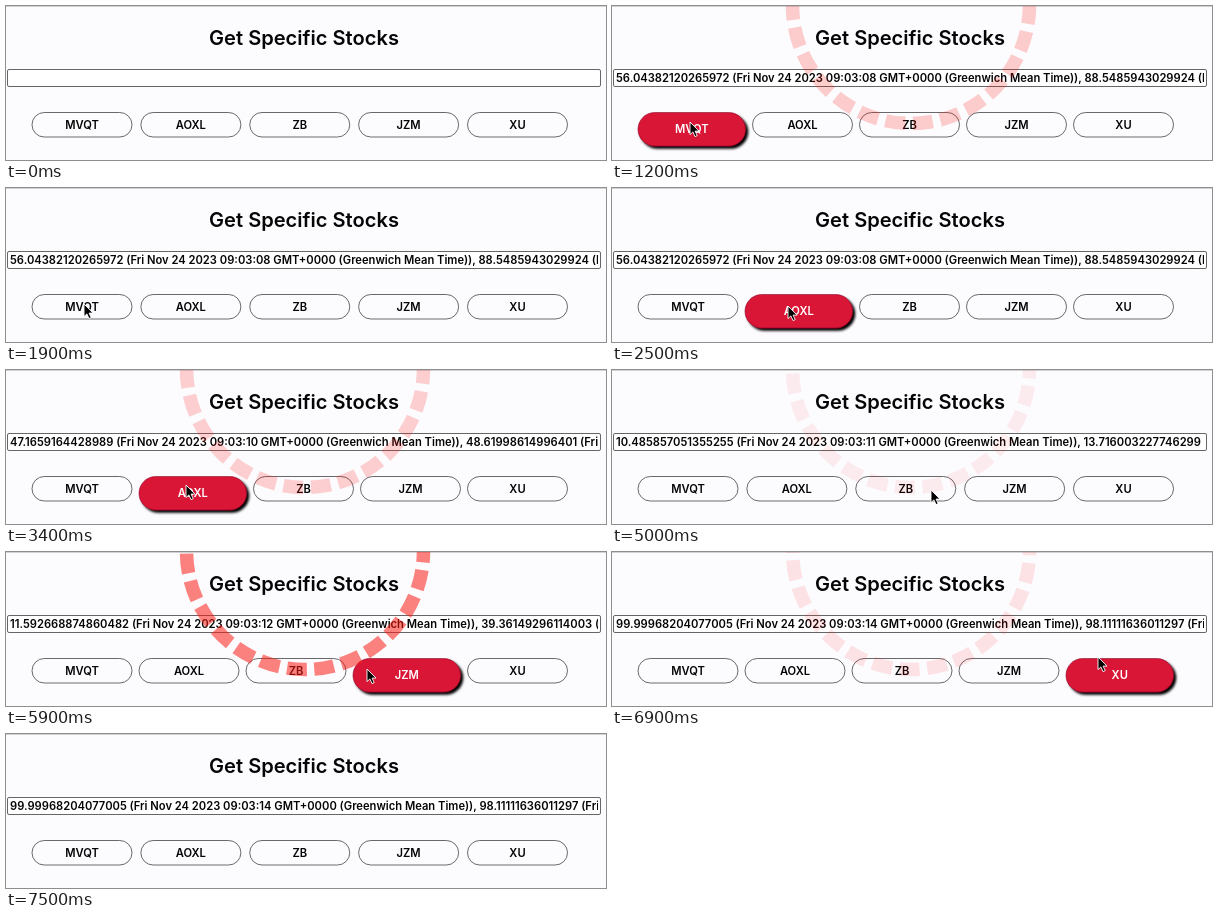
An HTML page that plays this animation: 600x154 px, repeating every 10 s.

```html
<!DOCTYPE html>
<html lang="en">
<head>
<meta charset="utf-8">
<title>Get Specific Stocks</title>
<style>
  html, body { margin: 0; width: 100%; height: 100%; overflow: hidden; background: #fcfbfe; }
  #stage { display: block; width: 600px; height: 154px; }
  text { font-family: Inter, "Open Sans", sans-serif; font-weight: 600; font-size: 11.2px; fill: #050505; }
  .middle { text-anchor: middle; }
  #title { font-size: 20.1px; }
</style>
</head>
<body>
<svg id="stage" viewBox="0 0 600 154">
  <rect width="600" height="154" fill="#fcfbfe"/>
  <rect width="600" height="1" fill="#d2d1d4"/>
  <text id="title" class="middle" x="298" y="38.5">Get Specific Stocks</text>
  <rect x="1.5" y="63.5" width="593" height="17" rx="1.5" fill="#fff" stroke="#666"/>
  <svg x="4" y="64" width="588" height="16"><text id="prices" x="0" y="12"></text></svg>
  <defs>
    <filter id="shadow" x="-10%" y="-20%" width="125%" height="150%">
      <feDropShadow dx="2.5" dy="2.5" stdDeviation="1" flood-color="#000"/>
    </filter>
  </defs>
  <g id="buttons"></g>
  <circle id="ring" cx="299" cy="-1" r="118.5" fill="none" stroke="#fb1a14" stroke-width="13.5"/>
  <path id="cursor" d="M0 0V12.6L2.9 9.9L5 14.6L7.2 13.6L5.1 9.1H9Z" fill="#000" stroke="#fff" stroke-width=".9"/>
</svg>
<script>
const LOOP = 10000, STEP = 100;
const byId = id => document.getElementById(id);
const prices = byId('prices'), ring = byId('ring'), cursor = byId('cursor');

// Response time, clock seconds, first and second price
const quotes = [
  [1050, '08', '56.04382120265972', '88.5485943029924'],
  [3255, '10', '47.1659164428989', '48.61998614996401'],
  [4380, '11', '10.485857051355255', '13.716003227746299'],
  [5550, '12', '11.592668874860482', '39.36149296114003'],
  [6795, '14', '99.99968204077005', '98.11111636011297']
];

// Start, end, button
const hovers = [
  [700, 1600, 0], [2000, 2300, 0], [2400, 3700, 1],
  [3800, 4900, 2], [5200, 6400, 3], [6500, 7200, 4]
];

// Time, x, y of the pointer tip
const pointer = [
  [600, 72, 134], [900, 78, 116], [1900, 78, 116], [2500, 176, 118],
  [2800, 180, 115], [3500, 180, 115], [4000, 312, 121], [4200, 319, 120],
  [5000, 319, 120], [5400, 361, 117], [6100, 361, 117], [6600, 482, 112],
  [6800, 486, 105], [7100, 486, 105], [7500, 500, 156]
];

const PULSE = 700, PEAK = 0.54, DASHES = 27;
const pitch = 2 * Math.PI * 118.5 / DASHES;
ring.setAttribute('stroke-dasharray', `${pitch * 0.72} ${pitch * 0.28}`);

function add(parent, tag, attrs) {
  const node = document.createElementNS('http://www.w3.org/2000/svg', tag);
  set(node, attrs);
  return parent.appendChild(node);
}

function set(node, attrs) {
  for (const key in attrs) node.setAttribute(key, attrs[key]);
}

const buttons = ['MVQT', 'AOXL', 'ZB', 'JZM', 'XU'].map(name => {
  const group = add(byId('buttons'), 'g', {});
  const box = add(group, 'rect', { y: 106.5 });
  const label = add(group, 'text', { class: 'middle' });
  label.textContent = name;
  return { box, label };
});

function layoutButtons(active) {
  const left = 26, span = 535.5;
  const widths = buttons.map((_, i) => i === active ? 107.5 : 100);
  const gap = (span - widths.reduce((a, b) => a + b)) / (buttons.length - 1);
  let x = left;
  buttons.forEach(({ box, label }, i) => {
    const on = i === active, height = on ? 33.5 : 24.5;
    set(box, {
      x, width: widths[i], height, rx: height / 2,
      fill: on ? '#d91236' : '#fcfbfe',
      stroke: on ? '#8d1029' : '#444', 'stroke-width': on ? 0.6 : 0.8,
      filter: on ? 'url(#shadow)' : 'none'
    });
    set(label, { x: x + widths[i] / 2, y: on ? 127.3 : 122.7 });
    label.style.fill = on ? '#fff' : '#050505';
    x += widths[i] + gap;
  });
}

function pointerAt(t) {
  const i = pointer.findIndex(p => p[0] > t);
  if (i < 1) return null;
  const [a, b] = [pointer[i - 1], pointer[i]];
  const k = (t - a[0]) / (b[0] - a[0]), ease = k * k * (3 - 2 * k);
  return [a[1] + (b[1] - a[1]) * ease, a[2] + (b[2] - a[2]) * ease];
}

function quoteText([, seconds, first, second]) {
  const stamp = `(Fri Nov 24 2023 09:03:${seconds} GMT+0000 (Greenwich Mean Time))`;
  return `${first} ${stamp}, ${second} ${stamp}`;
}

function render(t) {
  const quote = quotes.filter(q => q[0] <= t).pop();
  prices.textContent = quote ? quoteText(quote) : '';

  const hover = hovers.find(h => t >= h[0] && t < h[1]);
  layoutButtons(hover ? hover[2] : -1);

  const phase = quote ? (t - quote[0]) / PULSE : 1;
  const alpha = phase < 1 ? PEAK * Math.sin(Math.PI * phase) ** 2 : 0;
  const angle = 89.1 + (t - 5900) * 0.09;
  set(ring, { opacity: alpha, transform: `rotate(${angle} 299 -1)` });

  const tip = pointerAt(t);
  set(cursor, {
    visibility: tip ? 'visible' : 'hidden',
    transform: tip ? `translate(${tip})` : ''
  });
}

const start = performance.now();
function tick() {
  const t = (performance.now() - start) % LOOP;
  render(Math.floor(t / STEP) * STEP);
  requestAnimationFrame(tick);
}
tick();
</script>
</body>
</html>
```
